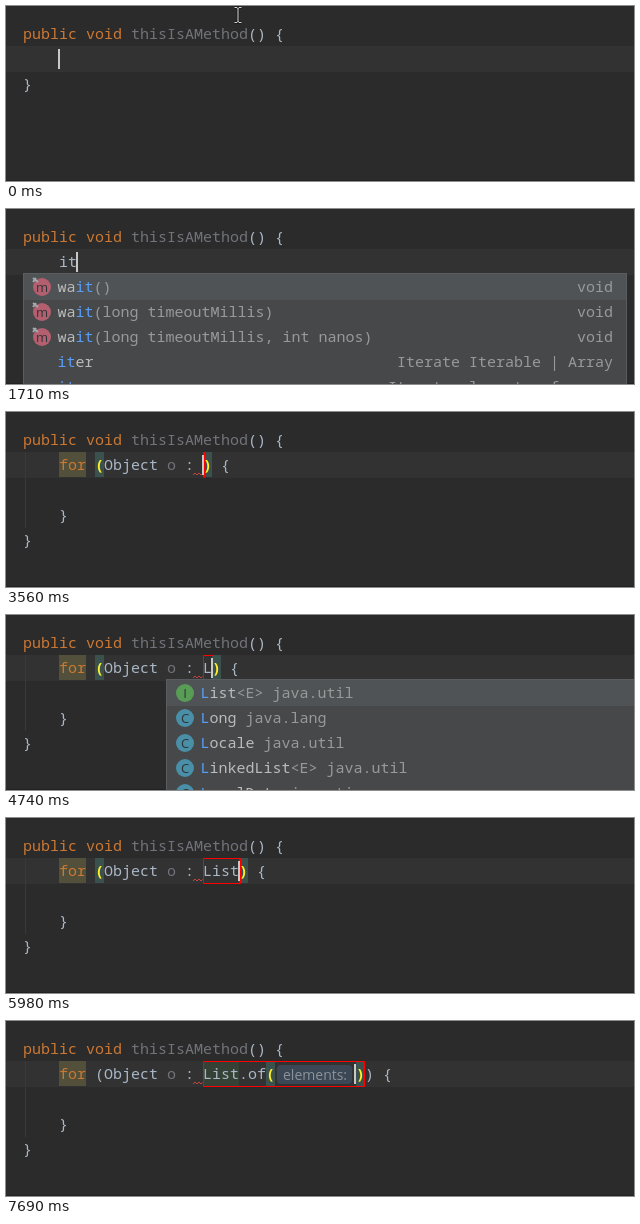
An HTML page for the animation above (7990 ms loop, 628 by 175 pixels).

```html
<!DOCTYPE html>
<html lang="en">
<head>
<meta charset="utf-8">
<title>Code completion</title>
<style>
  html, body { margin: 0; width: 100%; height: 100%; overflow: hidden; background: #2b2b2b; }
  svg { display: block; width: 628px; height: 175px; }
  text { font: 15px "Noto Sans Mono", "DejaVu Sans Mono", monospace; white-space: pre; }
  text.ui { font: 11px "Open Sans", "Noto Sans", sans-serif; }
  text.hint { font: 14px "Open Sans", "Noto Sans", sans-serif; }
  text.icon { font: 13px "Open Sans", "Noto Sans", sans-serif; text-anchor: middle; }
</style>
</head>
<body>
<svg id="stage" viewBox="0 0 628 175" xmlns="http://www.w3.org/2000/svg"></svg>
<script>
const LOOP = 7990, CH = 9, LEFT = 17, FIELD = 197;
const C = {
  text: '#a9b7c6', key: '#cc7832', dim: '#72737a', brace: '#ffef28', braceBg: '#3b514d',
  item: '#bbbbbb', soft: '#999999', match: '#589df6', red: '#ff0000'
};

// Rows read "icon~name~tail~type"
const lists = {
  i: ['~if', '~int', "~ifn~~Inserts 'if null' statement", "~inn~~Inserts 'if not null' statement",
    '~iter~~Iterate Iterable | Array'],
  it: ['m~wait~()~void', 'm~wait~(long timeoutMillis)~void', 'm~wait~(long timeoutMillis, int nanos)~void',
    '~iter~~Iterate Iterable | Array', '~itar~~Iterate elements of array'],
  ite: ['~iter~~Iterate Iterable | Array', '~iten~~Iterate java.util.Enumeration'],
  iter: ['~iter~~Iterate Iterable | Array'],
  L: ['I~List~<E> java.util', 'C~Long~ java.lang', 'C~Locale~ java.util', 'C~LinkedList~<E> java.util',
    'C~LocalDate~ java.time'],
  Li: ['I~List~<E> java.util', 'C~LinkedList~<E> java.util', 'C~LinkedHashMap~<K, V> java.util',
    'C~LinkedHashSet~<E> java.util', 'I~ListIterator~<E> java.util'],
  Lis: ['I~List~<E> java.util'],
  List: ['I~List~<E> java.util', 'I~ListIterator~<E> java.util', 'C~ListResourceBundle~ java.util',
    'C~ListView~ javax.swing.text', 'C~ListDataEvent~ javax.swing.event'],
  dot: ['m~of~(E... elements)', 'm~of~()', 'm~copyOf~(Collection<? extends E> coll)', 'm~of~(E e1)',
    'm~of~(E e1, E e2)'],
  o: ['m~of~(E... elements)', 'm~of~()', 'm~of~(E e1)', 'm~of~(E e1, E e2)', 'm~of~(E e1, E e2, E e3)']
};
const insertTip = 'Press Enter to insert, Tab to replace';
const dotTip = 'Press Ctrl+. to choose the selected (or first) suggestion and insert a dot afterwards';
const wide = (list, prefix, extra) => ({ list, prefix, x: 17, w: 604, tip: insertTip, next: 213, ...extra });
const side = (list, prefix, x = 160) => ({ list, prefix, x, w: 480, tip: dotTip, next: 604 });

// Each step changes part of the state from its time on
const steps = [
  [0, { typed: '', mouse: true, caret: true, popup: null, loop: false, lit: false, marked: false, call: false, hint: false }],
  [150, { caret: false }],
  [700, { caret: true }],
  [1160, { typed: 'i', mouse: false }],
  [1310, { popup: wide('i', 'i') }],
  [1710, { typed: 'it', popup: wide('it', 'it') }],
  [1860, { typed: 'ite' }],
  [1940, { popup: wide('ite', 'ite', { busy: true }) }],
  [2260, { popup: wide('ite', 'ite') }],
  [2490, { typed: 'iter', popup: wide('iter', 'iter', { busy: true }) }],
  [2950, { popup: wide('iter', 'iter') }],
  [3180, { typed: '', popup: null, loop: true }],
  [3240, { lit: true }],
  [3560, { marked: true }],
  [4260, { caret: false }],
  [4570, { caret: true, typed: 'L' }],
  [4740, { popup: side('L', 'L') }],
  [4890, { typed: 'Li', popup: side('Li', 'Li') }],
  [5040, { typed: 'Lis', popup: side('Lis', 'Lis') }],
  [5270, { typed: 'List', popup: side('Lis', 'List') }],
  [5420, { popup: side('List', 'List') }],
  [5980, { popup: null }],
  [6370, { typed: 'List.' }],
  [6530, { popup: side('dot', '', 205) }],
  [6830, { typed: 'List.o' }],
  [6910, { popup: side('o', 'o', 205) }],
  [7610, { typed: 'List.of', call: true, popup: null }],
  [7690, { hint: true }]
];

const esc = s => s.replace(/&/g, '&amp;').replace(/</g, '&lt;');
const rect = (x, y, w, h, fill, more = '') =>
  `<rect x="${x}" y="${y}" width="${w}" height="${h}" fill="${fill}" ${more}/>`;
const text = (x, y, s, fill, more = '') => `<text x="${x}" y="${y}" fill="${fill}" ${more}>${esc(s)}</text>`;
const line = (d, stroke, w = 1) => `<path d="${d}" fill="none" stroke="${stroke}" stroke-width="${w}"/>`;

// Lays out [string, colour] pairs on the character grid
function run(x, y, parts) {
  return parts.map(([s, fill]) => {
    const out = s.trim() ? text(x, y, s, fill) : '';
    x += s.length * CH;
    return out;
  }).join('');
}

function paren(x, s, lit) {
  return lit
    ? rect(x, 40, CH, 25, C.braceBg) + text(x, 58, s, C.brace, 'font-weight="700" style="font-weight:700"')
    : text(x, 58, s, C.text);
}

function icon(kind, x, y) {
  const fill = { m: '#b45f70', I: '#589c56', C: '#4a8fa8' }[kind];
  return `<circle cx="${x}" cy="${y}" r="9" fill="${fill}"/>` +
    text(x, y + 4.5, kind, '#2f3436', 'class="icon"') +
    (kind === 'm' ? line(`M${x - 9} ${y - 9}l5 4M${x - 9} ${y - 5}l3 -4`, '#a4a9ad', 2) : '');
}

function row(spec, i, p) {
  const [kind, name, tail = '', type = ''] = spec.split('~');
  const y = 83 + 25 * i, at = p.prefix ? name.indexOf(p.prefix) : -1;
  const end = at + p.prefix.length;
  const parts = at < 0 ? [[name, C.item]]
    : [[name.slice(0, at), C.item], [name.slice(at, end), C.match], [name.slice(end), C.item]];
  return (kind ? icon(kind, p.x + 19, y - 5) : '') +
    run(p.x + 34.5, y, [...parts, [tail, C.soft]]) +
    (type ? text(607 - type.length * CH, y, type, C.soft) : '');
}

function spinner(x, y) {
  let out = '';
  for (let i = 0; i < 8; i++) {
    const a = i * Math.PI / 4, c = Math.cos(a), s = Math.sin(a);
    out += `<path d="M${x + 3.5 * c} ${y + 3.5 * s}L${x + 6.5 * c} ${y + 6.5 * s}" stroke="#afb1b3" stroke-width="2" opacity="${0.3 + i * 0.09}"/>`;
  }
  return out;
}

function popup(p) {
  const rows = lists[p.list], foot = 65 + 25 * rows.length, mid = foot + 14;
  let out = rect(p.x, 64, p.w, foot - 64 + 29, '#46484a') +
    rect(p.x, 65, p.w, 26, '#4f5355') +
    rect(p.x, foot + 1, p.w, 27, '#414446') +
    rect(p.x + 0.5, 64.5, p.w - 1, foot - 64 + 28, 'none', 'stroke="#5a5d5f"') +
    rows.map((r, i) => row(r, i, p)).join('');
  if (foot < 175) {
    out += text(p.x + 8, mid + 5, p.tip, '#919496', 'class="ui"') +
      text(p.next, mid + 5, 'Next Tip', C.match, 'class="ui"');
    for (const d of [-6, 0, 6]) out += `<circle cx="${p.x + p.w - 16}" cy="${mid + d}" r="1.9" fill="#afb1b3"/>`;
    if (p.busy) out += spinner(575, mid);
  }
  return out;
}

function loopCode(s) {
  const end = FIELD + s.typed.length * CH;
  const close = s.call ? 359 : end;
  let out = line('M19.5 40V116', '#393939');
  if (s.marked) out += rect(53, 40, 27, 25, '#52503a');
  if (s.hint) out += rect(FIELD, 41, 36, 24, '#344134');
  out += run(53, 58, [['for', C.key], [' ', ''], [' ', ''], ['Object ', C.text],
    ['o', s.marked ? C.dim : C.text], [' : ', C.text], [s.typed, C.text]]);
  out += paren(89, '(', s.lit && !s.call);
  if (s.call) {
    const inner = s.hint ? 350 : end + CH;
    out += paren(end, '(', true) + paren(inner, ')', true);
    if (s.hint) out += rect(271, 44, 75, 19, '#3b4754', 'rx="4"') + text(277, 58.5, 'elements:', '#8c9299', 'class="hint"');
  }
  const outer = s.call && !s.hint ? end + 2 * CH : close;
  out += paren(outer, ')', s.lit && !s.call) + text(outer + 2 * CH, 58, '{', C.text);
  if (s.marked) out += line('M187 63l2 -2 2 2 2 -2 2 2 1.5 -1.5', '#c9413d');
  const right = s.call ? outer - 0.5 : end + 1.5;
  out += line(`M197.5 40.5H${right}V65.5H197.5Z`, C.red);
  return out + text(53, 108, '}', C.text) + text(LEFT, 133, '}', C.text);
}

function caretX(s) {
  if (s.hint) return 348;
  return (s.loop ? FIELD : 53) + (s.typed.length + (s.call ? 1 : 0)) * CH - 1;
}

function mouse() {
  const d = 'M228.5 1.5H231L232 2.5L233 1.5H235.5M232 2V16M228.5 16.5H231L232 15.5L233 16.5H235.5';
  return line(d, '#1c1c1c', 3) + line(d, '#d8d8d8', 1);
}

function draw(s) {
  return rect(0, 0, 628, 175, '#2b2b2b') + rect(0, 40, 628, 26, '#323232') + rect(0, 174, 628, 1, '#222222') +
    run(LEFT, 33, [['public', C.key], [' ', ''], ['void', C.key], [' ', ''], ['thisIsAMethod', C.dim], ['() {', C.text]]) +
    (s.loop ? loopCode(s) : text(53, 58, s.typed, C.text) + text(LEFT, 83, '}', C.text)) +
    (s.caret ? rect(caretX(s), 43, 2, 20, '#c8c8c8') : '') +
    (s.popup ? popup(s.popup) : '') +
    (s.mouse ? mouse() : '');
}

const stage = document.getElementById('stage');
let start = null, shown = 0;

function update(ms) {
  const count = steps.filter(([at]) => at <= ms).length;
  if (count === shown) return;
  shown = count;
  stage.innerHTML = draw(Object.assign({}, ...steps.slice(0, count).map(([, change]) => change)));
}

function tick(now) {
  if (start === null) start = now;
  update(Math.max(0, now - start) % LOOP);
  requestAnimationFrame(tick);
}

update(0);
requestAnimationFrame(tick);
</script>
</body>
</html>
```
